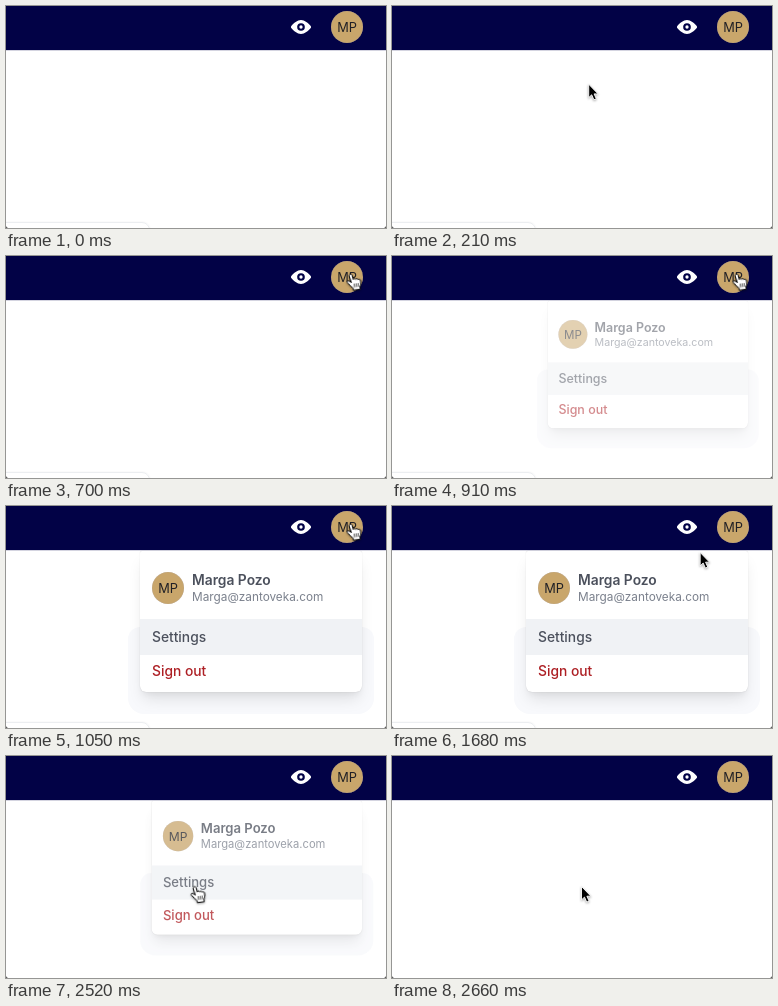
Animation, 380 px wide and 222 px high, one loop 3290 ms. Source, as an HTML page:

```html
<!DOCTYPE html>
<html lang="en">
<head>
<meta charset="utf-8">
<title>Account menu</title>
<style>
  html, body { margin: 0; width: 100%; height: 100%; overflow: hidden; background: #fff; }
  #stage {
    position: relative; width: 380px; height: 222px; overflow: hidden;
    background: #fff; font-family: Inter, Roboto, sans-serif;
  }
  #stage div, #stage svg { position: absolute; box-sizing: border-box; }
  .header { left: 0; top: 0; width: 380px; height: 44px; background: #020246; box-shadow: 0 1px #d4d4e0; }
  .eye { left: 285px; top: 10.5px; }
  .avatar {
    width: 32px; height: 32px; border-radius: 50%; background: #c9a66b; box-shadow: inset 0 0 1px #aaa0a0;
    color: #202026; font-size: 12.8px; line-height: 33px; text-align: center;
  }
  .card {
    left: -20px; top: 216px; width: 164px; height: 30px; border-radius: 8px;
    border: 1px solid #eceef1; box-shadow: 0 0 2px #0001;
  }
  .menu { left: 134px; top: 45px; width: 222px; height: 141px; transform-origin: 100% 0; }
  .halo { left: -12px; top: 76px; width: 246px; height: 87px; border-radius: 12px 12px 16px 16px; background: #f8f9fc; }
  .panel {
    inset: 0; border-radius: 2px 2px 6px 6px; background: #fff; overflow: hidden;
    box-shadow: 0 0 1px #0003, 0 10px 15px -3px #0000001a, 0 4px 6px -2px #0000000d;
  }
  .active { left: 0; top: 68px; width: 100%; height: 36px; background: #f0f2f5; }
  .text { left: 12px; white-space: nowrap; line-height: 20px; font-size: 13.8px; font-weight: 500; color: #4b505c; }
  .name { left: 52px; top: 19px; font-weight: 600; }
  .mail { left: 52px; top: 36px; font-size: 11.8px; font-weight: 400; color: #7b818d; }
  .out { top: 110px; color: #ad1f24; }
  #cursor { left: 0; top: 0; overflow: visible; }
  #arrow, #hand { filter: drop-shadow(0 1px 1px #0005); }
  .corner { bottom: 0; width: 3px; height: 3px; }
</style>
</head>
<body>
<div id="stage">
  <div class="header"></div>
  <svg class="eye" width="20" height="20" viewBox="0 0 24 24">
    <path fill="#fff" d="M23.4 10.5C20.8 7.6 16.4 3.6 12 3.6S3.2 7.6.6 10.5a2.2 2.2 0 0 0 0 3C3.2 16.4 7.5 20.4 12 20.4s8.7-4 11.4-6.9a2.2 2.2 0 0 0 0-3Z"/>
    <circle cx="12" cy="12" r="4.6" fill="#020246"/>
    <circle cx="12" cy="12" r="2" fill="#fff"/>
  </svg>
  <div class="avatar" style="left:325px;top:4.5px">MP</div>
  <div class="card" id="card"></div>
  <div class="menu" id="menu">
    <div class="halo"></div>
    <div class="panel">
      <div class="avatar" style="left:12px;top:20.5px">MP</div>
      <div class="text name">Marga Pozo</div>
      <div class="text mail">Marga@zantoveka.com</div>
      <div class="active"></div>
      <div class="text" style="top:76px">Settings</div>
      <div class="text out">Sign out</div>
    </div>
  </div>
  <div class="corner" style="left:0;background:radial-gradient(circle at 100% 0,#0000 2.6px,#555 3.6px)"></div>
  <div class="corner" style="right:0;background:radial-gradient(circle at 0 0,#0000 2.6px,#555 3.6px)"></div>
  <svg id="cursor" width="1" height="1">
    <circle id="ring" r="32" fill="none" stroke="#333" stroke-opacity=".55" stroke-width="3"/>
    <path id="arrow" d="M0 0V13.4L3 10.6 5.2 15.6 7.6 14.6 5.4 9.7H9.4Z" fill="#000" stroke="#fff" stroke-width=".9"/>
    <g id="hand" transform="translate(-1) rotate(-8)" stroke="#000" stroke-linejoin="round" stroke-linecap="round">
      <path fill="#fff" d="M-1.6 1.6C-1.7-.3 1.1-.4 1.4 1.4L2.1 6C2.4 4.7 4.4 4.8 4.6 6.2 5 5.2 6.8 5.4 7 6.8 7.5 6.1 9 6.4 9 8 9.2 11 8.4 12.5 7.6 14V16.4H.6V14.6C-1 12.8-2.2 10.6-4.2 8.5-5.2 7-3.5 5.7-2 7L-.6 8.5Z"/>
      <path fill="none" stroke-width=".7" d="M2.2 10.5V13.4M4.2 10.5V13.4M6.2 10.5V13.4"/>
    </g>
  </svg>
</div>
<script>
const LOOP = 3290, TICK = 70;
const entry = [88, 153], profile = [345.5, 18], settings = [189.5, 130.5];
const $ = id => document.getElementById(id);

const ramp = (t, a, b) => Math.min(1, Math.max(0, (t - a) / (b - a)));
const smooth = u => u * u * (3 - 2 * u);
const easeOut = (u, power) => 1 - (1 - u) ** power;
const show = (id, on) => { $(id).style.visibility = on ? 'visible' : 'hidden'; };

function glide(from, to, u, powers) {
  return from.map((v, i) => v + (to[i] - v) * easeOut(u, powers[i]));
}

function pointer(t) {
  return t < 1610
    ? glide(entry, profile, ramp(t, 70, 560), [1.63, 2.4])
    : glide(profile, settings, ramp(t, 1610, 2030), [1.5, 1.6]);
}

function draw(t) {
  const open = smooth(ramp(t, 765, 1050)) - smooth(ramp(t, 2450, 2660));
  $('menu').style.opacity = open;
  $('menu').style.transform = `scale(${0.8 + 0.2 * open})`;

  const [x, y] = pointer(t);
  const seen = t >= TICK;
  const link = y < 44 ? x > 300 : y > 113 && open > 0.5;
  $('cursor').style.transform = `translate(${x}px, ${y}px)`;
  show('hand', seen && link);
  show('arrow', seen && !link);
  show('ring', [630, 2310].includes(t));
  show('card', t < 2520);
}

function loop() {
  draw(Math.floor(performance.now() % LOOP / TICK) * TICK);
  requestAnimationFrame(loop);
}
loop();
</script>
</body>
</html>
```
